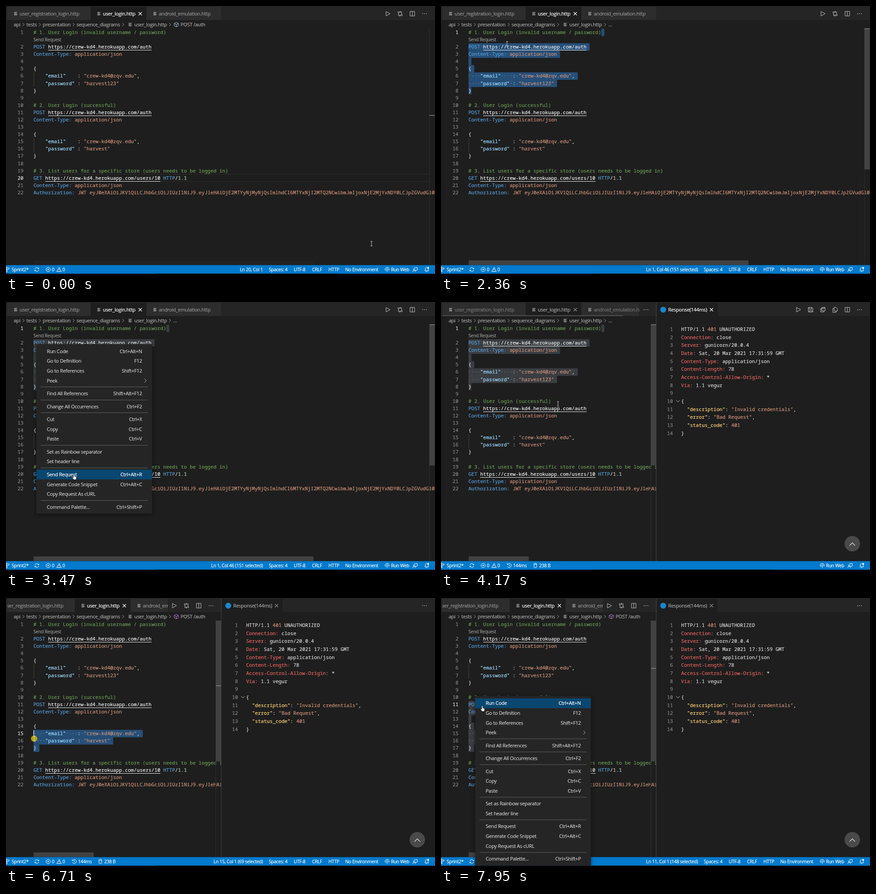
Write an HTML page that moves like this. It is 946 px wide and 592 px high and loops after 8000 ms.

```html
<!DOCTYPE html>
<html lang="en">
<head>
<meta charset="utf-8">
<title>HTTP login requests</title>
<style>
html, body { margin: 0; width: 100%; height: 100%; overflow: hidden; background: #1e1e1e; }
svg { display: block; width: 100vw; height: 100vh; }
text { white-space: pre; }
text, tspan { fill: currentColor; stroke: currentColor; stroke-width: .22px; }
.ui { font: 10.85px "Open Sans", "Noto Sans", sans-serif; letter-spacing: -.25px; }
.sm { font: 10px "Open Sans", "Noto Sans", sans-serif; letter-spacing: -.23px; }
.code { font: 10.858px "Noto Sans Mono", "DejaVu Sans Mono", monospace; }
</style>
</head>
<body>
<svg id="stage" viewBox="0 0 946 592" preserveAspectRatio="none"></svg>
<script>
const NS = 'http://www.w3.org/2000/svg';
const stage = document.getElementById('stage');
const LOOP = 8000, CW = 6.515, LH = 16.09, X0 = 60.5;
const OPEN = 3930, REFOCUS = 6350;

function el(tag, attrs, parent = stage) {
  const node = document.createElementNS(NS, tag);
  set(node, attrs);
  parent.appendChild(node);
  return node;
}
function set(node, attrs) {
  for (const k in attrs) node.setAttribute(k, attrs[k]);
}
const group = (parent, attrs = {}) => el('g', attrs, parent);
const rect = (p, x, y, width, height, fill, more = {}) =>
  el('rect', { x, y, width, height, fill, ...more }, p);
function label(p, str, x, y, cls = 'ui', color = '#ccc', anchor = 'start') {
  const node = el('text', { x, y: y + (cls === 'sm' ? 3.6 : 3.9), class: cls, color, 'text-anchor': anchor }, p);
  node.textContent = str;
  return node;
}
const icon = (p, name, x, y, stroke = '#c5c5c5', width = 1) =>
  el('path', { d: ICONS[name], transform: `translate(${x} ${y})`, fill: 'none', stroke, 'stroke-width': width }, p);
const show = (node, on) => node.setAttribute('display', on ? 'inline' : 'none');
const tint = (node, color) => node.setAttribute('color', color);
const clamp = v => Math.max(0, Math.min(1, v));
const ramp = (t, a, b) => clamp((t - a) / (b - a));

const ICONS = {
  play: 'M-4-5L5 0L-4 5Z',
  compare: 'M-3.5-1V4H1M-1 2L1 4L-1 6M3.5 1V-4H-1M1-6L-1-4L1-2M-5-3a1.5 1.5 0 1 0 3 0a1.5 1.5 0 1 0-3 0M2 3a1.5 1.5 0 1 0 3 0a1.5 1.5 0 1 0-3 0',
  split: 'M-5-5H5V5H-5ZM0-5V5',
  dots: 'M-4.8 0h1.5M-.7 0h1.5M3.4 0h1.5',
  save: 'M-5-5H3L5-3V5H-5ZM-3-5V-1.5H2.5V-5M-3 5V2H3V5',
  saveAll: 'M-2.5-5H5V2.5H-2.5ZM-.5-5V-2H3V-5M-2.5-2.5H-5V5H2.5V2.5',
  copy: 'M-2-5.5H2L5-2.5V3H-2ZM-2-2.5H-5V6H2V3',
  close: 'M-3.5-3.5L3.5 3.5M3.5-3.5L-3.5 3.5',
  list: 'M-3-3H4M-3-1H2M-3 1H4M-3 3H3',
  cube: 'M0-5L4.7-2.5V2.5L0 5L-4.7 2.5V-2.5ZM-4.7-2.5L0 0L4.7-2.5M0 0V5',
  right: 'M-1.6-3.4L1.8 0L-1.6 3.4',
  more: 'M-2-4L2 0L-2 4',
  down: 'M-4-2L0 2L4-2',
  up: 'M-6 3L0-3L6 3',
  branch: 'M-2-2.5V3M-2 1Q2.5 1 2.5-1M-3.5-4a1.5 1.5 0 1 0 3 0a1.5 1.5 0 1 0-3 0M-3.5 4a1.5 1.5 0 1 0 3 0a1.5 1.5 0 1 0-3 0M1-2.5a1.5 1.5 0 1 0 3 0a1.5 1.5 0 1 0-3 0',
  sync: 'M-4.2-1A4.3 4.3 0 0 1 4-1.5M4.2 1A4.3 4.3 0 0 1-4 1.5M5-3.5L4.2-1L1.8-2M-5 3.5L-4.2 1L-1.8 2',
  error: 'M-4.7 0a4.7 4.7 0 1 0 9.4 0a4.7 4.7 0 1 0-9.4 0M-2-2L2 2M2-2L-2 2',
  warn: 'M0-4.5L5 4.5H-5ZM0-1.5V1.5M0 2.8V3.6',
  clock: 'M-4-2A4.5 4.5 0 1 1-4 2M-4.5-4.5V-2H-2M0-2.5V.5L2 1.7',
  data: 'M-3-3.5a3 1.4 0 1 0 6 0a3 1.4 0 1 0-6 0V3.5a3 1.4 0 0 0 6 0V-3.5',
  antenna: 'M-3 3.2A4.5 4.5 0 1 1 3 3.2M-1.5 1.2A2.1 2.1 0 1 1 1.5 1.2M0 0V5',
  person: 'M-2-4H5V1H3.5L1.5 3V1M-5 5A3 3 0 0 1 1 5M-3.5 0a1.5 1.5 0 1 0 3 0a1.5 1.5 0 1 0-3 0',
  bell: 'M-4.5 3H4L3 1V-1A3 3 0 0 0-3.4-1V1ZM-1.5 4.5H1'
};

// Code is written as colour~text~colour~text.
const COLORS = {
  c: '#6a9955', k: '#569cd6', u: '#ececec', s: '#ce9178', p: '#9cdcfe',
  d: '#d8d8d8', n: '#b5cea8', h: '#e0645f', y: '#ffd27a'
};
const AUTH = 'k~POST ~u~https://crew-kd4.herokuapp.com/auth';
const TYPE = 'k~Content-Type: ~s~application/json';
const MAIL = 'p~    "email"    ~d~: ~s~"crew-kd4@zqv.edu"~d~,';
const PASS = 'p~    "password" ~d~: ~s~';
const REQUEST = [
  'c~# 1. User Login (invalid username / password)',
  AUTH, TYPE, '', 'd~{', MAIL, PASS + '"harvest123"', 'd~}', '',
  'c~# 2. User Login (successful)',
  AUTH, TYPE, '', 'd~{', MAIL, PASS + '"harvest"', 'd~}', '',
  'c~# 3. List users for a specific store (users needs to be logged in)',
  'k~GET ~u~https://crew-kd4.herokuapp.com/users/10~k~ HTTP~d~/~n~1.1',
  TYPE,
  'k~Authorization: ~s~JWT eyJ0eXAiOiJKV1QiLCJhbGciOiJIUzI1NiJ9.eyJleHAiOjE2MTYyNjMyNjQsImlhdCI6MTYxNjI2MTQ2NCwibmJmIjoxNjE2MjYxNDY0LCJpZGVudGl0'
];
const RESPONSE = [
  'd~HTTP/1.1 ~s~401~d~ UNAUTHORIZED', 'h~Connection:~d~ close', 'h~Server:~d~ gunicorn/20.0.4',
  'h~Date:~d~ Sat, 20 Mar 2021 17:31:59 GMT', 'h~Content-Type:~d~ application/json',
  'h~Content-Length:~d~ 78', 'h~Access-Control-Allow-Origin:~d~ *', 'h~Via:~d~ 1.1 vegur', '',
  'd~{', 'y~  "description"~d~: ~s~"Invalid credentials"~d~,',
  'y~  "error"~d~: ~s~"Bad Request"~d~,', 'y~  "status_code"~d~: ~s~401', 'd~}'
];
const plain = REQUEST.map(m => m.split('~').filter((_, i) => i % 2).join(''));
const len = n => plain[n - 1].length;
const rowY = n => 58 + LH * (n === 1 ? 0 : n);

function codeLine(p, markup, x, y) {
  const parts = markup.split('~');
  const node = label(p, '', x, y, 'code');
  for (let i = 0, col = 0; i + 1 < parts.length; i += 2) {
    const str = parts[i + 1];
    el('tspan', { color: COLORS[parts[i]] }, node).textContent = str;
    if (parts[i] === 'u') rect(p, x + col * CW, Math.round(y + 7), str.length * CW, 1, COLORS.u);
    col += str.length;
  }
}

// Editor
rect(stage, 0, 0, 946, 592, '#1e1e1e');
const clip = el('clipPath', { id: 'pane' }, el('defs', {}));
const paneClip = rect(clip, 0, 0, 946, 592, '#fff');
const editor = group(stage, { 'clip-path': 'url(#pane)' });
const activeLine = group(editor);
const activeTop = rect(activeLine, 61, 0, 872, 1, '#2b2b2b');
const activeBottom = rect(activeLine, 61, 0, 872, 1, '#2b2b2b');
const selection = group(editor);
for (const n of [6, 15]) rect(editor, 61, rowY(n) - 8, 1, LH * 2, '#404040');
const numbers = REQUEST.map((m, i) => {
  codeLine(editor, m, X0, rowY(i + 1));
  return label(editor, i + 1, 38.5, rowY(i + 1), 'code', '#858585', 'end');
});
label(editor, 'Send Request', X0, 74.3, 'sm', '#999');
const folds = group(editor);
for (const n of [5, 14]) icon(folds, 'down', 51.5, rowY(n));
const caret = rect(editor, 0, 0, 1.4, 15, '#e0e0e0');

const ruler = group(stage);
rect(ruler, 933, 50, 1, 522, '#2f2f2f');
const vBar = rect(ruler, 934, 50, 11.5, 311, '#424242');
const mark = rect(ruler, 934, 0, 11.5, 1.4, '#8a8a8a');
const hBar = rect(stage, 61, 562, 617, 10, '#424242');

const crumbs = group(stage), dim = '#a9a9a9';
[['api', 17], ['tests', 45], ['presentation', 81], ['sequence_diagrams', 155.5], ['user_login.http', 283]]
  .forEach(([s, x]) => label(crumbs, s, x, 41, 'ui', dim));
[38.5, 74.5, 149, 258, 361.5].forEach(x => icon(crumbs, 'right', x, 41, dim));
icon(crumbs, 'list', 273.5, 41);
const symbol = group(crumbs);
const cube = icon(symbol, 'cube', 375.5, 41);
label(symbol, 'POST /auth', 385, 41, 'ui', dim);
const ellipsis = label(crumbs, '...', 369, 41, 'ui', dim);

// Tabs
rect(stage, 0, 0, 946, 31, '#252526');
const tabClip = rect(el('clipPath', { id: 'tabs' }), 3, 0, 943, 31, '#fff');
const tabs = group(group(stage, { 'clip-path': 'url(#tabs)' }));
rect(tabs, 3, 2, 183.5, 29, '#2d2d2d');
rect(tabs, 187, 2, 122.5, 29, '#1e1e1e');
rect(tabs, 310, 2, 164.5, 29, '#2d2d2d');
const tabText = [['user_registration_login.http', 30], ['user_login.http', 213.5], ['android_emulation.http', 337]]
  .map(([s, x]) => {
    icon(tabs, 'list', x - 9, 17);
    return label(tabs, s, x, 16.8, 'ui', '#949494');
  });
const tabClose = icon(tabs, 'close', 296, 17, '#fff', 1.2);
const tabScroll = rect(stage, 3, 29.5, 398, 1.5, '#5a5a5a');
function tools(x, names) {
  const g = group(stage);
  names.forEach((name, i) => icon(g, name, x + i * 27, 17, '#c5c5c5', name === 'dots' ? 1.6 : 1));
  return g;
}
const editTools = ['play', 'compare', 'split', 'dots'];
const wideTools = tools(842, editTools);

// Response pane
const pane = group(stage);
rect(pane, 475, 0, 471, 573, '#1e1e1e');
rect(pane, 475, 0, 471, 31, '#252526');
rect(pane, 476, 2, 134, 29, '#1e1e1e');
rect(pane, 474, 2, 1, 571, '#444');
el('circle', { cx: 490, cy: 17, r: 6.5, fill: '#1a87c9' }, pane);
const paneTitle = label(pane, 'Response(144ms)', 501, 16.8);
const paneClose = icon(pane, 'close', 596.5, 17, '#fff', 1.2);
RESPONSE.forEach((m, i) => {
  const y = 60.3 + 17.64 * i;
  codeLine(pane, m, 529.5, y);
  label(pane, i + 1, 511.5, y, 'code', '#858585', 'end');
});
icon(pane, 'down', 522.5, 219);
el('circle', { cx: 907, cy: 534, r: 17, fill: '#4a4a4a' }, pane);
icon(pane, 'up', 907, 535, '#ddd', 1.3);
const leftDots = tools(452, ['dots']);
const leftTools = tools(371, editTools);
const paneTools = tools(788, ['play', 'save', 'saveAll', 'copy', 'split', 'dots']);
const paneDots = tools(923, ['dots']);

// Status bar
rect(stage, 0, 572.4, 946, 18.6, '#007acc');
rect(stage, 0, 591, 946, 1, '#0d2a40');
rect(stage, 334, 591, 396, 1, '#05090c');
const status = group(stage);
const note = (p, str, x, anchor) => label(p, str, x, 582.3, 'sm', '#fff', anchor);
[['branch', 3], ['sync', 68], ['error', 93], ['warn', 117], ['antenna', 840.5], ['person', 902], ['bell', 928]]
  .forEach(([name, x]) => icon(status, name, x, 582, '#fff'));
el('circle', { cx: 931, cy: 578.5, r: 2, fill: '#fff' }, status);
[['Sprint2*', 12.5], ['0', 101], ['0', 124.5], ['Run Web', 849]].forEach(([s, x]) => note(status, s, x));
const fileInfo = group(status);
[['Spaces: 4', 579.5], ['UTF-8', 634.5], ['CRLF', 675], ['HTTP', 711], ['No Environment', 748]]
  .forEach(([s, x]) => note(fileInfo, s, x));
const position = note(fileInfo, '', 566.5, 'end');
const timing = group(status);
icon(timing, 'clock', 150.5, 582, '#fff');
const elapsed = note(timing, '', 159);
const size = group(status);
icon(size, 'data', 208, 582, '#fff');
note(size, '238 B', 216.5);

// Context menu, laid out from its own top left corner
const menu = group(stage);
rect(menu, 0, 0, 255, 374.5, '#252526', { style: 'filter:drop-shadow(0 2px 4px rgba(0,0,0,.5))' });
const hover = rect(menu, 0, 0, 255, 21.6, '#094771');
const menuRows = [];
let itemY = 16;
for (const entry of [
  'Run Code|Ctrl+Alt+N', 'Go to Definition|F12', 'Go to References|Shift+F12', 'Peek|>', '',
  'Find All References|Shift+Alt+F12', '', 'Change All Occurrences|Ctrl+F2', '',
  'Cut|Ctrl+X', 'Copy|Ctrl+C', 'Paste|Ctrl+V', '', 'Set as Rainbow separator|', 'Set header line|', '',
  'Send Request|Ctrl+Alt+R', 'Generate Code Snippet|Ctrl+Alt+C', 'Copy Request As cURL|', '',
  'Command Palette...|Ctrl+Shift+P'
]) {
  if (!entry) {
    rect(menu, 9.5, Math.round(itemY - 8), 236, 1, '#616161');
    itemY += 7;
    continue;
  }
  const [name, key] = entry.split('|');
  const item = group(menu, { color: '#ccc' });
  label(item, name, 23, itemY, 'ui', 'inherit');
  if (key === '>') icon(item, 'more', 240.5, itemY);
  else label(item, key, 233, itemY, 'ui', 'inherit', 'end');
  menuRows.push({ y: itemY, item });
  itemY += 21.55;
}

// Pointer
const pointer = group(stage);
const press = el('circle', { r: 7, fill: '#c9b60c', 'fill-opacity': .85 }, pointer);
const beam = el('path', { d: 'M-2-5H2M0-5V5M-2 5H2', stroke: '#cfcfcf', fill: 'none' }, pointer);
const solid = d => el('path', { d, fill: '#fff', stroke: '#000', 'stroke-width': .7 }, pointer);
const arrow = solid('M0-1V9L2.2 7L3.8 10.4L5.4 9.6L3.8 6.5H7Z');
const hand = solid('M-1.2 1.2a1.2 1.2 0 0 1 2.4 0V5l3 .8q1.4 .4 1.2 1.8L4.6 12.5H-.6L-3.4 8.6q-1-1.6 .4-2l1.8 1.2Z');

// Motion: time, x, y
const PATH = [
  [70, 806, 525], [300, 602, 400], [840, 80, 176], [1000, 80, 176], [1220, 79, 188], [1380, 72, 187],
  [1460, 60, 172], [1560, 47, 151], [1640, 50, 122], [1720, 90, 105], [1800, 200, 86], [1880, 356, 58],
  [2150, 356, 58], [2440, 67, 93], [2700, 133, 107], [3000, 133, 107], [3350, 150, 380], [3520, 150, 380],
  [3850, 242, 297], [4100, 258, 225], [4300, 258, 225], [4450, 282, 202], [4720, 381, 155], [4900, 465, 142],
  [5120, 520, 146], [5290, 520, 146], [5600, 307, 138], [5900, 96, 294], [6090, 96, 294], [6350, 62, 348],
  [6930, 62, 288], [7010, 57, 268], [7170, 56, 236], [7420, 56, 236], [7620, 76, 240], [7800, 91, 238]
];
function mouseAt(t) {
  const i = PATH.findIndex(p => p[0] > t);
  if (i < 0) return PATH[PATH.length - 1].slice(1);
  if (!i) return PATH[0].slice(1);
  const a = PATH[i - 1], b = PATH[i], k = ramp(t, a[0], b[0]);
  return [a[1] + (b[1] - a[1]) * k, a[2] + (b[2] - a[2]) * k];
}

const DRAGS = [
  { line: 8, col: 2, steps: [[1380, 8], [1460, 7], [1560, 6], [1640, 4], [1720, 3], [1800, 2], [1880, 1]] },
  { line: 18, col: 1, steps: [[6350, 18], [6450, 17], [6560, 16], [6700, 15], [6850, 14], [7010, 13], [7090, 12], [7170, 11]] }
];
function cursorAt(t) {
  if (t < 1380) return { line: 20, col: 1, end: 20, endCol: 1, count: 0 };
  const drag = DRAGS[t < REFOCUS ? 0 : 1];
  const line = drag.steps.filter(s => s[0] <= t).pop()[1];
  const col = line === 1 ? 46 : line === drag.line ? drag.col : 1;
  let count = drag.col - col;
  for (let n = line; n < drag.line; n++) count += len(n) + 2;
  return { line, col, end: drag.line, endCol: drag.col, count };
}

let drawn = '';
function drawSelection(cur, focused) {
  const key = cur.line + '/' + cur.end + focused;
  if (key === drawn) return;
  drawn = key;
  selection.textContent = '';
  if (!cur.count) return;
  for (let n = cur.line; n <= cur.end; n++) {
    const from = n === cur.line ? cur.col - 1 : 0;
    const to = n < cur.end ? len(n) + 1 : cur.endCol - 1;
    if (to <= from) continue;
    rect(selection, X0 + from * CW, rowY(n) - 8, (to - from) * CW, LH + .3, focused ? '#264f78' : '#3a3d41', { rx: 2 });
    if (from) continue;
    label(selection, plain[n - 1].replace(/./g, c => c === ' ' ? '·' : ' '), X0, rowY(n), 'code', focused ? '#6f8ba6' : '#75777a');
  }
}

function render(t) {
  const [mx, my] = mouseAt(t);
  const cur = cursorAt(t);
  const open = t >= OPEN, back = t >= REFOCUS;
  const firstMenu = t >= 2440 && t < 3520, lastMenu = t >= 7620;
  const menuOn = firstMenu || lastMenu;
  const active = !open || back;
  const focused = active && !menuOn;
  const dragging = (t >= 1380 && t < 1960) || (t >= REFOCUS && t < 7420);

  drawSelection(cur, focused);
  numbers.forEach((n, i) => tint(n, i + 1 === cur.line ? '#e0e0e0' : '#858585'));
  show(activeLine, focused && !cur.count);
  set(activeTop, { y: Math.round(rowY(cur.line) - 8.5) });
  set(activeBottom, { y: Math.round(rowY(cur.line) + 7.5) });
  show(caret, focused && (dragging || Math.floor(t / 500) % 2));
  set(caret, { x: X0 + (cur.col - 1) * CW, y: rowY(cur.line) - 7.5 });
  folds.setAttribute('opacity', .8 * Math.max(
    ramp(t, 1480, 1550) * (1 - ramp(t, 1960, 2040)), ramp(t, 7000, 7080) * (1 - ramp(t, 7500, 7620))));

  set(paneClip, { width: open ? 475 : 946 });
  set(ruler, { transform: `translate(${open ? -471 : 0} 0)` });
  const idle = ramp(t, 5290, 5400) * (1 - ramp(t, 5400, 5500));
  const bars = ramp(t, 70, 170) * (1 - idle);
  const onBar = open && mx > 462 && mx < 475;
  set(vBar, { opacity: bars, fill: onBar ? '#4f4f4f' : '#424242' });
  set(hBar, { width: open ? 132.5 : 617, opacity: Math.max(.12, bars) });
  set(mark, { y: 49.5 + 9.57 * (cur.line === 1 ? 0 : cur.line) });

  const hidden = t >= 2040 && !back;
  show(symbol, !hidden);
  show(ellipsis, hidden);
  cube.setAttribute('stroke', back ? '#b180d7' : '#b0c4d8');

  set(tabClip, { width: back ? 354 : open ? 434 : 943 });
  set(tabs, { transform: `translate(${back ? -35 : 0} 0)` });
  tabText.forEach((s, i) => tint(s, i === 1 ? (active ? '#fff' : '#a8a8a8') : (active ? '#949494' : '#777')));
  tabClose.setAttribute('stroke', active ? '#fff' : '#8c8c8c');
  tabScroll.setAttribute('opacity', open ? 1 - ramp(t, 4400, 4700) : 0);
  show(wideTools, !open);
  show(pane, open);
  show(leftDots, open && !back);
  show(leftTools, back);
  show(paneTools, open && !back);
  show(paneDots, back);
  tint(paneTitle, back ? '#a8a8a8' : '#fff');
  paneClose.setAttribute('stroke', back ? '#8c8c8c' : '#fff');

  show(fileInfo, active);
  position.textContent = `Ln ${cur.line}, Col ${cur.col}` + (cur.count ? ` (${cur.count} selected)` : '');
  show(timing, t >= 3520);
  elapsed.textContent = open ? '144ms' : 'Waiting';
  show(size, open);

  show(menu, menuOn);
  const left = lastMenu ? 75.5 : 67, top = lastMenu ? 216.5 : 93;
  set(menu, { transform: `translate(${left} ${top})` });
  const over = menuRows.find(r => Math.abs(my - top - r.y) < 10.8);
  menuRows.forEach(r => tint(r.item, r === over ? '#fff' : '#ccc'));
  show(hover, over);
  if (over) set(hover, { y: over.y - 10.8 });

  const inGutter = !menuOn && mx < 59;
  set(pointer, { transform: `translate(${mx} ${my})` });
  show(press, dragging);
  show(hand, menuOn);
  show(arrow, inGutter || onBar);
  show(beam, !menuOn && !inGutter && !onBar);
}

function tick() {
  render(performance.now() % LOOP);
  requestAnimationFrame(tick);
}
tick();
</script>
</body>
</html>
```
